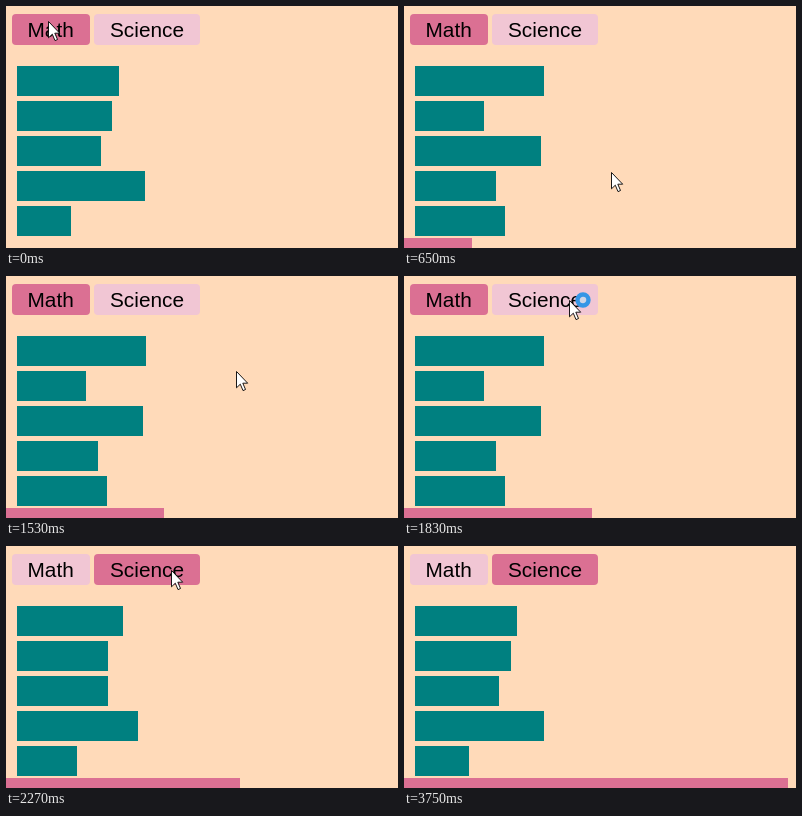
An HTML page that plays this animation: 392 px wide and 242 px high, repeating every 3.81 s.

```html
<!DOCTYPE html>
<html lang="en">
<head>
<meta charset="utf-8">
<title>Scores</title>
<style>
  html, body { margin: 0; width: 100%; height: 100%; overflow: hidden; background: #ffdab9; }
  svg { display: block; }
  text { font: 20.8px "Liberation Sans", Arial, sans-serif; fill: #000; }
</style>
</head>
<body>
<svg width="392" height="242" viewBox="0 0 392 242">
  <rect width="392" height="242" fill="#ffdab9"/>
  <rect id="math" x="6" y="8" width="78" height="31" rx="4"/>
  <rect id="science" x="88" y="8" width="106" height="31" rx="4"/>
  <text x="21.5" y="31">Math</text>
  <text x="104" y="31">Science</text>
  <g id="bars" fill="#008080"></g>
  <rect id="progress" y="232" height="10" fill="#db7093"/>
  <g id="cursor">
    <path d="M.5 .5V16.8L4.3 13.2L7 19.6L9.5 18.5L6.8 12.2H11.7Z" fill="#fff" stroke="#000" stroke-width=".9"/>
    <circle id="busy" cx="14" cy="0" r="5.5" fill="#cfd6e6" stroke="#3596e6" stroke-width="4.4"/>
  </g>
</svg>
<script>
const $ = id => document.getElementById(id);
const DARK = '#db7093', LIGHT = '#f1c6d4';
const WIDTH = 392, LEFT = 11;

// the picture advances in equal steps
const LOOP = 3810, STEPS = 52, STEP = LOOP / STEPS, LEAD = 20;

const TWEEN = 400, MATH_START = -68, SCIENCE_START = 2011, BUSY_START = 1830;

// right edges of the five bars
const math = [140, 80, 137, 92, 101];
const science = [112.6, 106.8, 94.6, 139.8, 64.6];

// pointer stops: step, x, y; it leaves through the bottom edge
const stops = [
  [0, 42, 15], [5, 42, 15], [8, 120, 76], [10, 294, 256],
  [18, 280, 256], [21, 230, 95], [24, 166, 19], [25, 165, 24],
  [33, 165, 24], [37, 285, 260], [STEPS, 285, 260]
];

const bars = math.map((_, i) => {
  const r = document.createElementNS('http://www.w3.org/2000/svg', 'rect');
  r.setAttribute('x', LEFT);
  r.setAttribute('y', 60 + 35 * i);
  r.setAttribute('height', 30);
  return $('bars').appendChild(r);
});

const lerp = (a, b, k) => a + (b - a) * k;

function cubicInOut(k) {
  k = Math.min(1, Math.max(0, k));
  return k < 0.5 ? 4 * k ** 3 : 1 - 4 * (1 - k) ** 3;
}

function pointerAt(step) {
  const n = stops.findIndex(p => p[0] > step);
  const [s0, x0, y0] = stops[n - 1], [s1, x1, y1] = stops[n];
  const k = (step - s0) / (s1 - s0);
  return [Math.round(lerp(x0, x1, k)), Math.round(lerp(y0, y1, k))];
}

function draw(time) {
  const step = Math.min(STEPS - 1, Math.floor((time + LEAD) / STEP));
  const t = step * STEP;

  const onScience = t >= SCIENCE_START;
  $('math').setAttribute('fill', onScience ? LIGHT : DARK);
  $('science').setAttribute('fill', onScience ? DARK : LIGHT);

  const [from, to, start] = onScience
    ? [math, science, SCIENCE_START]
    : [science, math, MATH_START];
  const k = cubicInOut((t - start) / TWEEN);
  bars.forEach((bar, i) =>
    bar.setAttribute('width', Math.round(lerp(from[i], to[i], k)) - LEFT));

  $('progress').setAttribute('width', Math.round(WIDTH * step / STEPS));
  $('cursor').setAttribute('transform', `translate(${pointerAt(step)})`);
  $('busy').style.display = t >= BUSY_START && !onScience ? '' : 'none';
}

const begin = performance.now();
function tick() {
  draw((performance.now() - begin) % LOOP);
  requestAnimationFrame(tick);
}
tick();
</script>
</body>
</html>
```
